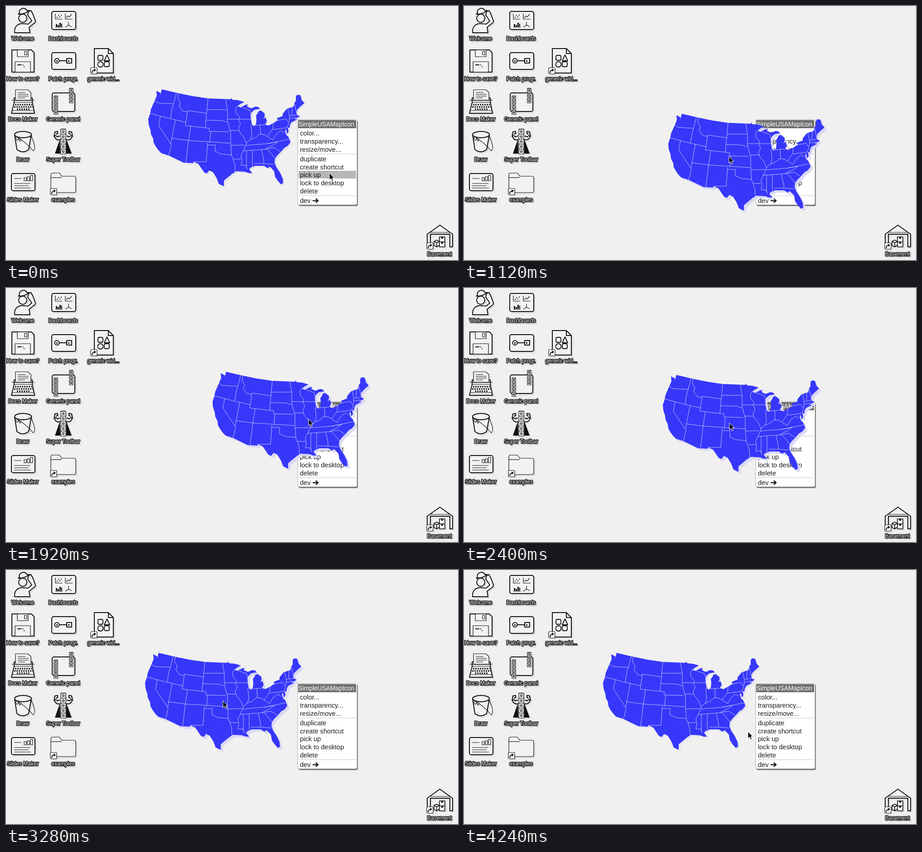
These frames come from a looping animation (998 by 561 pixels, 4.32 s). An HTML page:

```html
<!DOCTYPE html>
<html lang="en">
<head>
<meta charset="utf-8">
<title>Desktop</title>
<style>
html, body { margin: 0; width: 100%; height: 100%; overflow: hidden; background: #f0f0f0; }
svg { display: block; width: 100vw; height: 100vh; font-family: "Liberation Sans", Arial, sans-serif; }
#icons { fill: #f2f2f2; stroke: #111; stroke-width: 2; stroke-linejoin: round; filter: drop-shadow(3px 3px 0 #dedede); }
#icons .thin { stroke-width: 1.2; }
#icons .ink { fill: #111; stroke: none; }
#icons .line { fill: none; }
#icons text { font-size: 12px; text-anchor: middle; fill: #fff; stroke: #111; stroke-width: 3; paint-order: stroke; }
#menu text { font-size: 14.6px; fill: #1c1c1c; }
#menu .title { font-size: 13.8px; fill: #fff; }
#borders { fill: none; stroke: #dcdcf6; stroke-width: .8; stroke-linejoin: round; }
</style>
</head>
<body>
<svg viewBox="0 0 998 561">
  <g id="icons">
    <!-- Welcome -->
    <path d="M19 59C18 46 25 39 36 39C42 39 46 40 49 40L57 33L48 20L50 12L55 10L59 17L65 33Q65 37 61 39L51 47L53 59Z"/>
    <circle cx="37" cy="27" r="9"/>
    <path d="M30 16C26 7 42 0 46 10L51 10Q41 19 27 18Z"/>
    <!-- Dashboards -->
    <rect x="101" y="12" width="53" height="40" rx="4"/>
    <path class="line thin" d="M131 17V29H147M133 26L137 22L140 24L145 18M109 17V29H124M109 47H125M138 35V42L131 47M138 42L145 46"/>
    <path class="ink" d="M110 40h3v6h-3zM114 42h3v4h-3zM118 37h3v9h-3zM122 39h2v7h-2zM112 24h2v2h-2zM115 20h2v2h-2zM118 23h2v2h-2zM121 19h2v2h-2z"/>
    <!-- How to save? -->
    <path d="M13 97H56L62 103V146H13Z"/>
    <path class="thin" d="M25 97H49V112H25ZM41 100H46V108H41ZM20 123H54V146H20Z"/>
    <path class="line" d="M25 130H34M36 130H38M39 134H41"/>
    <!-- Patch -->
    <rect x="101" y="103" width="53" height="37" rx="4"/>
    <path d="M118 121H134M134 116H145V126H134Z"/>
    <circle cx="112.500" cy="121" r="5"/>
    <path class="ink" d="M111 120h3v3h-3zM137 120h3v3h-3z"/>
    <!-- Generic widget -->
    <path d="M195 94H226L237 105V148H195Z"/>
    <path class="line" d="M226 94V105H237"/>
    <g stroke-width="1.800">
      <rect x="203" y="109" width="11" height="11" rx="3"/>
      <path d="M223 108L229 121H217Z"/>
      <rect x="217" y="123" width="11" height="11" rx="3"/>
      <circle cx="208.500" cy="129" r="6"/>
    </g>
    <!-- Docs Maker -->
    <path d="M18 203H58V213L63 237H12L18 213Z"/>
    <path d="M21 209V185H48L55 191V209Z" class="thin"/>
    <path class="line thin" d="M26 191H43M26 195H50M26 199H50M26 203H42M12 208H63M18 213H58M13 231H62"/>
    <path class="line" stroke-width="3" stroke-dasharray="3 2" d="M20 218H57M18 223H59M24 228H53"/>
    <!-- Generic panel -->
    <rect x="102" y="192" width="50" height="41" rx="4"/>
    <g id="strips"></g>
    <!-- Draw -->
    <path d="M19 284L24 317Q37 327 50 317L56 284Z"/>
    <ellipse cx="37.500" cy="284" rx="18.500" ry="7"/>
    <path class="line thin" d="M20 287Q44 300 60 320Q68 315 56 288M22 290Q24 303 28 291Q31 305 33 293"/>
    <!-- Super Toolbar -->
    <path class="ink" d="M119 294L108 326H120ZM133 294L145 326H133Z"/>
    <path class="line" d="M120 295Q110 298 107 288Q109 284 113 289L119 287M106 289L108 278L114 277L114 282L110 283M133 295Q143 298 146 288Q144 284 140 289L134 287M147 289L145 278L139 277L139 282L143 283"/>
    <!-- Slides Maker -->
    <rect x="12" y="370" width="52" height="38" rx="4"/>
    <path class="line thin" d="M18 381H34M18 392H54M18 397H50M18 402H55M40 379h5v7h-5zM47 377h5v9h-5zM54 374h5v12h-5z"/>
    <!-- examples -->
    <path class="thin" d="M99 412V373Q99 369 103 369H118L123 376H150Q154 376 154 380V408Q154 412 150 412Z"/>
    <path class="line thin" d="M99 379H123"/>
    <!-- Basement -->
    <path d="M930 504L958 484L986 504V532H980V504H937V532H930Z"/>
    <path class="line thin" d="M937 500H980"/>
    <path stroke-width="1.600" d="M957 510H969V521H957ZM957 521H969V532H957ZM945 520L951 517L957 520V528L951 532L945 529ZM945 520L951 523L957 520M951 523V532"/>
    <path class="ink" d="M961 510h4v4h-4zM961 521h4v4h-4z"/>
    <g id="shortcuts"></g>
    <g id="labels"></g>
  </g>

  <g id="menu">
    <rect x="646" y="253" width="131" height="189" rx="4" fill="#777"/>
    <rect x="644" y="251" width="131" height="188" rx="3" fill="#fff" stroke="#aaa"/>
    <path d="M645 270V254Q645 252 647 252H771Q773 252 773 254V270Z" fill="#707070"/>
    <path d="M646 327H773M646 419H773" stroke="#e3e3e3" stroke-width="2"/>
    <rect id="hover" x="646" y="364" width="127" height="17" fill="#b6b6b6"/>
    <text class="title" x="645.500" y="266">SimpleUSAMapIcon</text>
    <g id="items"></g>
    <path d="M677 430H688M684 425.500L689 430L684 434.500" fill="none" stroke="#1c1c1c" stroke-width="2.400"/>
  </g>

  <g id="map">
    <path id="shade"/>
    <path id="land" fill="#3737fa"/>
    <path id="borders"/>
  </g>
  <path id="cursor" d="M0 0V15L3.500 12L6 17.500L8.500 16.500L6 11H10.500Z" fill="#000" stroke="#fff"/>
</svg>
<script>
const $ = id => document.getElementById(id);

// Static parts built from short rules
const labels = [
  ["Welcome", 37, 76], ["Dashboards", 126, 76],
  ["How to save?", 37, 165], ["Patch progr.", 126, 165], ["generic wid...", 215, 165],
  ["Docs Maker", 37, 254], ["Generic panel", 126, 254],
  ["Draw", 37, 343], ["Super Toolbar", 126, 343],
  ["Slides Maker", 37, 432], ["examples", 126, 432], ["Basement", 957, 552]
];
$("labels").innerHTML = labels.map(([s, x, y]) => `<text x="${x}" y="${y}">${s}</text>`).join("");

const strip = (x, y, size, count) => {
  let out = `<rect class="thin" x="${x}" y="${y}" width="${size}" height="${size * count}"/>`;
  for (let i = 0; i < count; i++) {
    const top = y + i * size;
    out += `<path class="line thin" d="M${x} ${top}h${size}"/>
      <rect class="thin" x="${x + size / 3}" y="${top + size / 3}" width="${size / 3}" height="${size / 3}"/>`;
  }
  return out;
};
$("strips").innerHTML = strip(106, 199, 8, 5) + strip(140, 182, 8, 4) + strip(121, 272, 11, 5);

const shortcut = ([x, y]) => `<g transform="translate(${x} ${y})">
  <rect class="thin" width="14" height="14" rx="2" style="fill:#fff"/>
  <path class="line" d="M3 12Q3 6 9 5.500"/><path class="ink" d="M7 2L12 5L8 9Z"/></g>`;
$("shortcuts").innerHTML = [[187, 136], [98, 403], [929, 523]].map(shortcut).join("");

const items = [
  ["color...", 286], ["transparency...", 304], ["resize/move...", 322],
  ["duplicate", 342.5], ["create shortcut", 360.5], ["pick up", 378],
  ["lock to desktop", 396], ["delete", 414], ["dev", 434.5]
];
$("items").innerHTML = items.map(([s, y]) => `<text x="649" y="${y}">${s}</text>`).join("");

const coast = {
  north: "344,184 378,192 412,199 446,204 496,206 497,203 500,207 512,208 526,212 518,216 511,221",
  michigan: "518,224 527,219 534,217 532,222 541,226 551,222 557,223 561,227 549,229 543,234 540,240 541,252 543,262 547,265 552,261 553,250 552,242 556,236 558,232 563,231 571,237 571,244 568,249 573,246 576,254 572,262",
  lakes: "580,264 593,257 600,252 598,248 611,243 611,238 620,227 635,222",
  atlantic: "637,213 640,210 640,200 643,196 650,197 653,208 659,214 650,222 643,229 641,236 643,241 649,243 645,246 636,250 644,250 630,257 627,263 626,270 622,268 624,277 621,283 618,272 616,276 619,285 623,288 626,294 628,301 622,309 615,313 607,322 599,330 594,337 593,346",
  gulf: "597,356 605,368 611,381 612,391 607,394 600,386 594,377 592,365 583,355 577,358 570,353 550,353 540,357 537,361 544,369 536,369 528,366 508,365 499,371 488,380 481,386 481,398",
  mexico: "470,393 465,380 457,367 449,363 443,370 437,367 425,349 414,344 413,347 392,346 359,330 343,325",
  pacific: "337,319 331,311 326,302 325,293 320,283 319,274 315,262 314,250 318,238 320,228 327,212 333,198 332,187 341,192 340,198"
};
const outline = "M" + Object.values(coast).join(" ") + "Z";
$("land").setAttribute("d", outline);
$("shade").setAttribute("d", outline);

const west = "M328 209L335 214L350 215L370 216M376 192L370 216L367 225L363 248M318 237Q355 248 398 257" +
  "M381 193L379 203L385 213L382 221L390 232L400 234M443 237L401 231L396 264L440 269L446 204" +
  "M341 243L337 264L365 306L362 320L359 330M374 251L364 304M365 292L403 297L495 303" +
  "M403 297L397 346M408 265L403 297M440 269L449 270V277L492 278M452 277L450 302" +
  "M445 302L442 344L414 344M445 307H462V321L475 327L498 329";
const middle = "M444 229H488M485 206L489 230V252L492 266L496 279V303L498 330L502 340L505 350L506 366" +
  "M441 252L476 253L489 257M489 250H514M494 275H514M496 308L527 307M502 338H519" +
  "M511 221L507 228L508 236L516 246L513 251L518 260L513 269L516 279L525 290L531 303L525 318L519 330L521 342L519 352H530L533 361" +
  "M514 250H541M541 262L543 285L540 295L530 303";
const east = "M521 224L538 230L541 239M531 320V357M544 319V354M564 318L569 340V348M548 348H569L592 350M524 320L577 316" +
  "M529 308L577 304L627 294M572 316L590 307L600 300M577 316L589 330L594 337M577 315L592 313L606 322" +
  "M540 295L550 291L560 283L570 284L578 289L589 296L597 283L607 275L614 280M561 263L562 284" +
  "M545 264L571 262M590 259L589 271L583 280L577 288M589 273L620 269L625 259L618 249L594 254" +
  "M622 226L626 243L625 256M632 223L631 241M637 215L641 234M626 243L642 240M626 249L640 246M600 300L577 304";
$("borders").setAttribute("d", west + middle + east);

// Pointer track: time, x, y
const track = [
  [0, 714, 369], [480, 713, 371], [720, 711, 373], [800, 704, 371], [1120, 585, 332],
  [1360, 402, 303], [1440, 384, 300], [1520, 390, 301], [1840, 629, 290], [1920, 668, 289],
  [2080, 696, 291], [2320, 612, 297], [2400, 586, 298], [2720, 502, 292], [3200, 480, 288],
  [3280, 479, 289], [3600, 479, 289], [4080, 627, 357], [4320, 627, 357]
];
const LOOP = 4320, STEP = 80, PICK = 480, DROP = 3520;
const grip = [487, 289];

const slope = (i, k) => (track[i + 1][k] - track[i][k]) / (track[i + 1][0] - track[i][0]);
const tangent = (i, k) => {
  if (i === 0 || i === track.length - 1) return 0;
  const a = slope(i - 1, k), b = slope(i, k);
  return a * b <= 0 ? 0 : 2 * a * b / (a + b);
};

// Monotone cubic interpolation, so stops never overshoot
function pointer(t) {
  let i = 0;
  while (i < track.length - 2 && t >= track[i + 1][0]) i++;
  const span = track[i + 1][0] - track[i][0], u = (t - track[i][0]) / span;
  return [1, 2].map(k => {
    const a = track[i][k], b = track[i + 1][k];
    const ease = u * u * (3 - 2 * u);
    return a + (b - a) * ease + span * u * (1 - u) * ((1 - u) * tangent(i, k) - u * tangent(i + 1, k));
  });
}

const move = (id, [x, y]) => $(id).setAttribute("transform", `translate(${Math.round(x)} ${Math.round(y)})`);

function draw(time) {
  const t = Math.floor(time % LOOP / STEP) * STEP;
  const held = t >= PICK && t < DROP;
  // The carried map trails the pointer by one step
  const hand = pointer(Math.min(t, DROP) - (t >= PICK ? STEP : 0));
  const at = t < PICK ? [0, 0] : t < 3280 ? hand.map((v, k) => v - grip[k]) : [-7, -1];
  move("map", at);
  move("cursor", pointer(t));
  $("shade").setAttribute("transform", held ? "translate(5 5)" : "translate(3 3)");
  $("shade").setAttribute("fill", held ? "#d9d8f4" : "#e0e0ee");
  $("hover").setAttribute("visibility", t < PICK ? "visible" : "hidden");
}

const start = performance.now();
function tick() {
  draw(performance.now() - start);
  requestAnimationFrame(tick);
}
tick();
</script>
</body>
</html>
```
